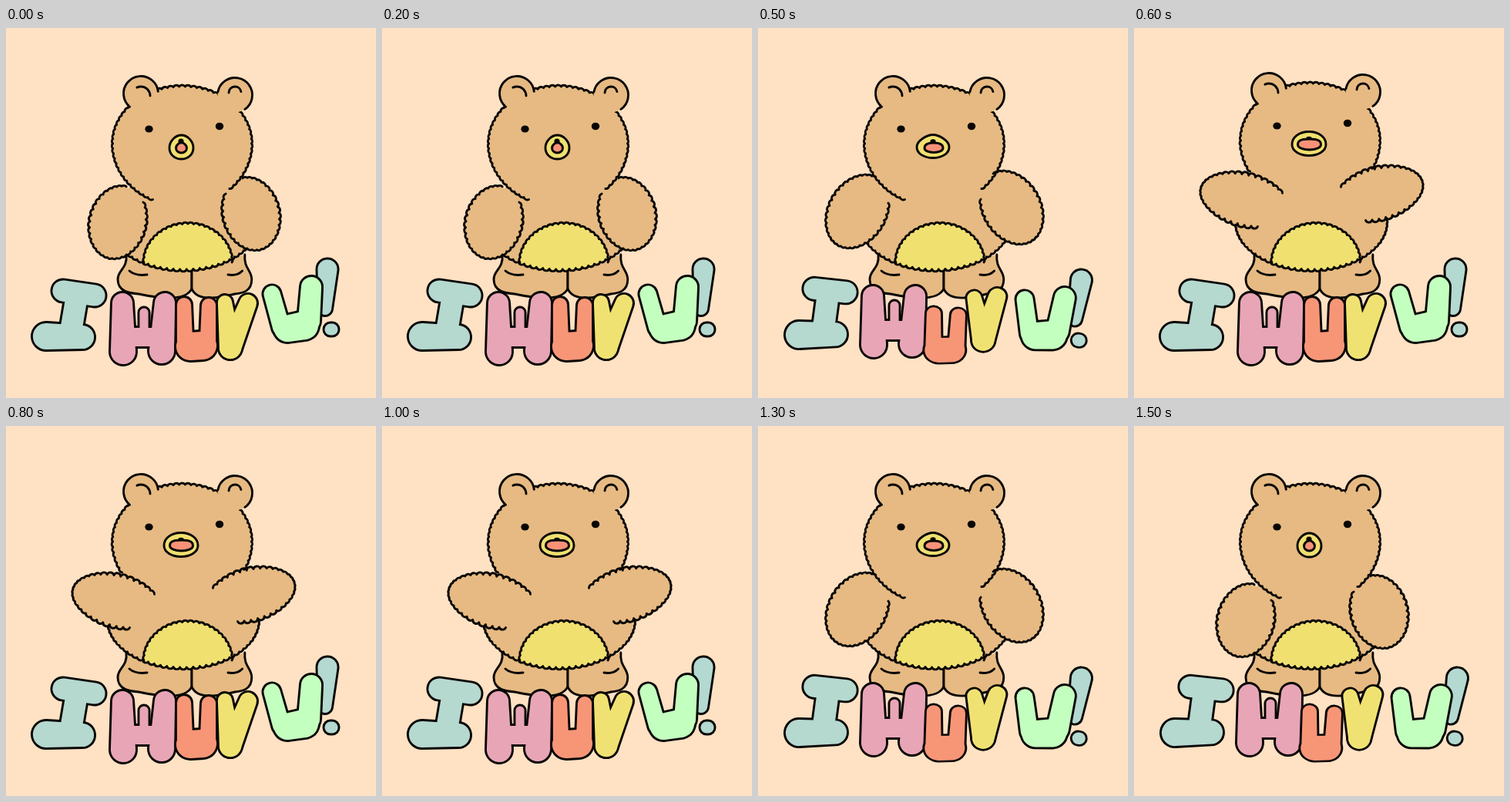
Recreate the animation shown at these times as an HTML page with a canvas. Size 480 by 480 pixels, loop 1600 ms.

```html
<!DOCTYPE html>
<html lang="en">
<head>
<meta charset="utf-8">
<title>I wuvv u!</title>
<style>
html, body { margin: 0; width: 100%; height: 100%; overflow: hidden; background: #ffe1c3; }
canvas { display: block; width: 480px; height: 480px; }
</style>
</head>
<body>
<canvas id="stage" width="480" height="480"></canvas>
<script>
const ctx = document.getElementById("stage").getContext("2d");
const PAPER = "#ffe1c3", INK = "#080604", FUR = "#e6ba82", YELLOW = "#f0e070", CORAL = "#f79278";
const STEP = 100, LOOP = 1600, LINE = 2.9;
const rad = deg => deg * Math.PI / 180;

function draw(path, fill, line = true) {
  if (fill) { ctx.fillStyle = fill; ctx.fill(path); }
  if (line) { ctx.strokeStyle = INK; ctx.stroke(path); }
}

function round(x, y, rx, ry = rx, from = 0, to = 360) {
  const p = new Path2D();
  p.ellipse(x, y, rx, ry, 0, rad(from), rad(to));
  return p;
}

const oval = (x, y, rx, ry, tilt = 0, flip = 1) => ({ x, y, rx, ry, tilt, flip });

// Part of an oval's edge, between two angles, as a row of small outward scallops.
function fuzzy(o, from, to) {
  const count = Math.round(rad(Math.abs(to - from)) * (o.rx + o.ry) / 2 / 7);
  const sweep = (to > from) === (o.flip > 0) ? 1 : 0;
  const c = Math.cos(rad(o.tilt)), s = Math.sin(rad(o.tilt));
  let d = "";
  for (let i = 0; i <= count; i++) {
    const t = rad(from + (to - from) * i / count);
    const u = o.rx * Math.cos(t), v = o.ry * Math.sin(t);
    d += `${i ? `A4.6 4.6 0 0 ${sweep} ` : "M"}${o.x + o.flip * (u * c - v * s)} ${o.y + u * s + v * c}`;
  }
  return new Path2D(d);
}

// Symmetric drop: half width w, height h; a small k makes the top pointed.
function drop(x, y, w, h, k) {
  const half = f => `M${x} ${y}c${f * w * k} 0 ${f * w} ${h * 0.25} ${f * w} ${h * 0.53}` +
    `s${-f * w * 0.45} ${h * 0.47} ${-f * w} ${h * 0.47}`;
  return new Path2D(half(1) + half(-1));
}

// Bear
const skull = oval(228.5, 150, 90, 74), jaw = oval(228.5, 150, 90, 80);
const torso = oval(230, 252, 98, 61), belly = oval(236, 304, 57, 50);
const hem = fuzzy(torso, -8, 188), trunk = fuzzy(torso, 0, 360);

const leg = new Path2D("M156 294C158 312 145 314 145 326C145 342 160 344 172 345Q232 358 241 338V313" +
  "M160 315Q168 322 183 320");
const otherLeg = new Path2D();
otherLeg.addPath(leg, new DOMMatrix().translate(241, 0).scale(-0.81, 1).translate(-241, 0));

// Arms are one tilted oval and its mirror image, left open at the shoulder.
function pose(left, right, [rx, ry, tilt], [from, to], neck, snout, mouth, nose) {
  return {
    arms: [fuzzy(oval(...left, rx, ry, tilt), from, to), fuzzy(oval(...right, rx, ry, tilt, -1), from, to)],
    jaw: [fuzzy(jaw, 180, neck[0]), fuzzy(jaw, 0, neck[1])],
    snout: drop(...snout), mouth: drop(...mouth), nose: round(227, 147, 3.6, nose)
  };
}

const down = pose([145, 252], [318, 241], [35.5, 47.5, 15], [-92, -405], [115, 47],
  [227.5, 139, 15.5, 31, 0.5], [227.5, 148, 7, 14, 0.1], 3.6);
const half = pose([129, 238], [329, 233], [36, 50, 30], [-92, -396], [115, 47],
  [227, 138.5, 21, 30, 0.35], [228, 149, 12, 12.5, 0.8], 2.8);
const wide = pose([144, 227], [317, 219], [32, 59, 105], [-131, -385], [150, 27],
  [227, 138.5, 22, 31, 0.6], [227.5, 148, 15, 14, 0.9], 2.2);

function drawBear(p, lift) {
  draw(leg, FUR);
  draw(otherLeg, FUR);
  draw(trunk, FUR, false);
  ctx.save();
  ctx.clip(trunk);
  draw(fuzzy(belly, 0, 360), YELLOW, false);
  ctx.restore();
  draw(fuzzy(belly, 180, 360));
  draw(hem);

  ctx.save();
  ctx.translate(0, -lift);
  draw(fuzzy(jaw, 0, 180), FUR, false);
  draw(fuzzy(skull, 180, 360), FUR);
  for (const [x, y, from, to] of [[175, 85, 130, 353], [297, 87, 190, 415]]) {
    draw(round(x, y, 22.5), FUR, false);
    draw(round(x, y, 22.5, 22.5, from, to));
  }
  draw(round(175, 88, 12, 12, -115, 0));
  draw(round(297, 84, 8, 8, 180, 350));
  p.arms.forEach(a => draw(a, FUR));
  p.jaw.forEach(j => draw(j));
  draw(round(185.5, 131, 5.2, 4.6), INK, false);
  draw(round(277, 127.5, 5.2, 4.8), INK, false);
  draw(p.snout, YELLOW);
  draw(p.mouth, CORAL);
  draw(p.nose, INK, false);
  ctx.restore();
}

// Bubble letters: each is a union of tapered capsules.
const cap = (x1, y1, r1, x2, y2, r2 = r1) => inset => {
  const a = Math.atan2(y2 - y1, x2 - x1);
  const off = Math.acos((r1 - r2) / Math.hypot(x2 - x1, y2 - y1));
  const p = new Path2D();
  p.arc(x1, y1, r1 - inset, a + off, a - off + 2 * Math.PI);
  p.arc(x2, y2, r2 - inset, a - off, a + off);
  p.closePath();
  return p;
};

// cx, cy: turning centre; x, y, turn, tall: the second of the two wobble positions.
const letters = [
  { color: "#b5d8cf", cx: 82, cy: 372, x: 0, y: -3, turn: -2, parts: [
    cap(74, 341, 16.5, 115, 347), cap(52, 400, 20, 99, 401, 18), cap(92, 347, 17, 83, 400)] },
  { color: "#e8a5b6", cx: 177, cy: 389, x: -2, y: -9, turn: 0, parts: [
    cap(151, 357, 16, 152, 420, 19), cap(206, 357, 16, 202, 419, 19),
    cap(179, 369, 8.5, 179, 400), cap(155, 401, 15, 202, 401)] },
  { color: "#f79677", cx: 247, cy: 390, x: -4, y: 8, turn: 2, tall: 0.88, parts: [
    cap(231, 359, 12, 232, 405, 13), cap(263, 360, 12, 262, 405, 13), cap(239, 413, 21, 255, 412)] },
  { color: "#f0e272", cx: 299, cy: 388, x: -1, y: -9, turn: -5, tall: 0.95, parts: [
    cap(284, 356, 12, 291, 415, 17), cap(314, 357, 14, 291, 415, 17)] },
  { color: "#b3d9d1", cx: 417, cy: 336, x: 0, y: 14, turn: 6, parts: [
    cap(417, 313, 15.5, 414, 364, 11), cap(421, 391, 10.5, 423, 391)] },
  { color: "#c3ffbe", cx: 372, cy: 365, x: -2, y: 10.5, turn: 8, parts: [
    cap(345, 345, 13.5, 357, 388, 14), cap(396, 336, 16, 393, 380, 17), cap(365, 390, 20, 387, 386, 21)] }
];

function drawLetters(second) {
  for (const { color, cx, cy, x, y, turn, tall = 1, parts } of letters) {
    ctx.save();
    if (second) {
      ctx.translate(cx + x, cy + y);
      ctx.rotate(rad(turn));
      ctx.scale(1, tall);
      ctx.translate(-cx, -cy);
    }
    parts.forEach(p => draw(p(0), INK, false));
    parts.forEach(p => draw(p(LINE), color, false));
    ctx.restore();
  }
}

// The bear is held on twos, the lettering swaps on ones.
const poses = [down, down, half, wide, wide, wide, half, down];
const HOP = 3;
const start = performance.now();
let shown = -1;

function tick() {
  const step = Math.floor((performance.now() - start) % LOOP / STEP);
  if (step !== shown) {
    shown = step;
    const beat = step >> 1;
    ctx.fillStyle = PAPER;
    ctx.fillRect(0, 0, 480, 480);
    ctx.lineWidth = LINE;
    ctx.lineCap = ctx.lineJoin = "round";
    drawBear(poses[beat], beat === HOP ? 4 : 0);
    drawLetters(step % 2 === 1);
  }
  requestAnimationFrame(tick);
}
tick();
</script>
</body>
</html>
```
